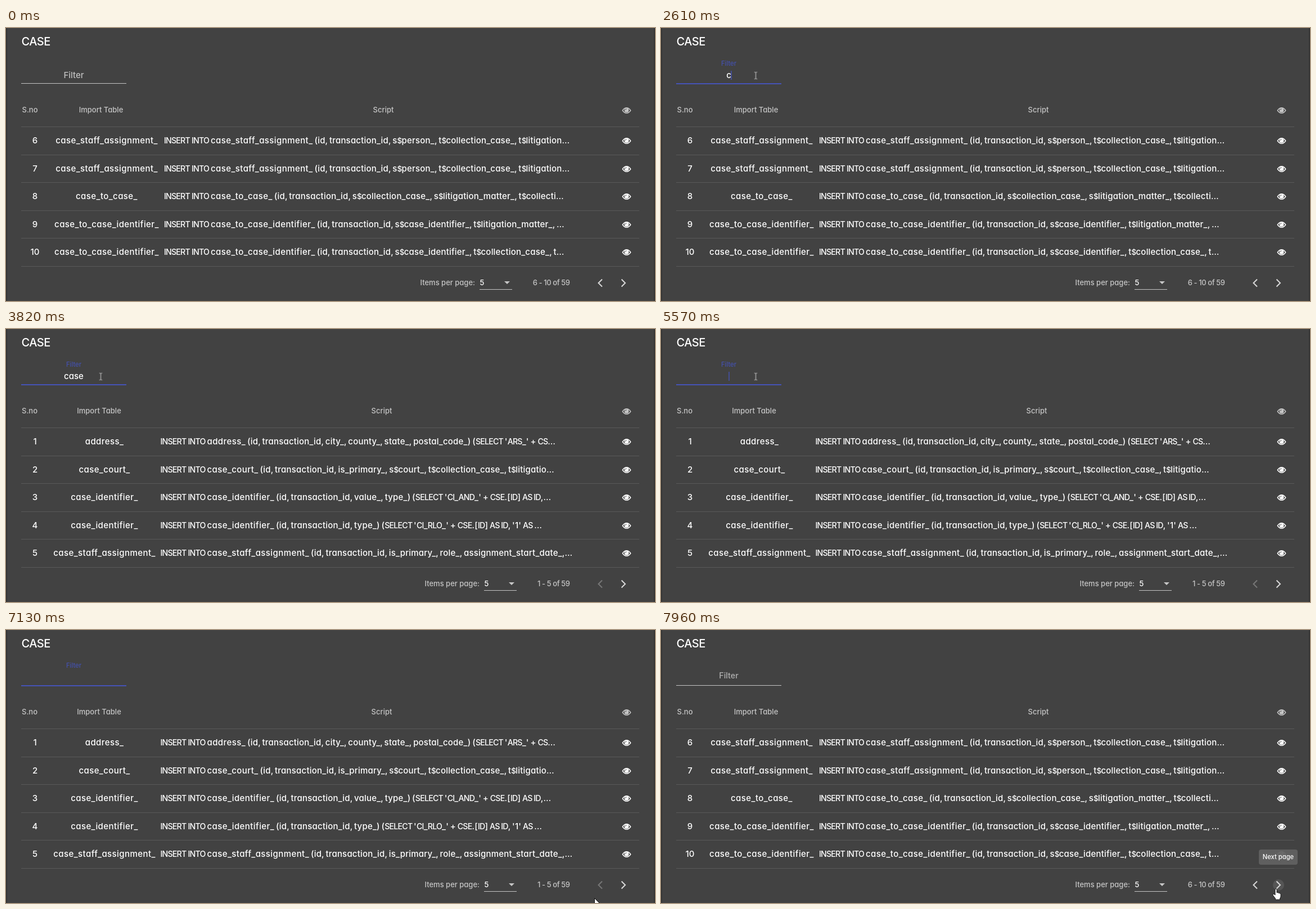
Write an HTML page that moves like this. It is 1154 px wide and 485 px high and loops after 8000 ms.

```html
<!DOCTYPE html>
<html lang="en">
<head>
<meta charset="utf-8">
<title>Case import scripts</title>
<style>
html, body { margin: 0; width: 100%; height: 100%; overflow: hidden; background: #424242; }
svg { display: block; width: 1154px; height: 485px; font: 450 15px Inter, sans-serif; font-feature-settings: "cv11"; }
text { fill: #fff; white-space: pre; }
.mid { text-anchor: middle; }
.end { text-anchor: end; }
.title { font-size: 20px; letter-spacing: -.5px; }
.name { letter-spacing: .42px; }
.script { letter-spacing: .2px; word-spacing: -1.5px; }
.caps { font-size: 14.2px; letter-spacing: -.8px; }
.dollar { font-size: 13.5px; letter-spacing: -.8px; }
.soft { font-size: 13px; fill: #c6c6c6; }
.range { letter-spacing: -.4px; }
.small { font-size: 13px; }
.rule { stroke: #595959; }
.chevron { fill: none; stroke: #d8d8d8; stroke-width: 2; }
.off { stroke: #777; }

/* 1% of the loop is 80 ms */
.steps, .steps > * { animation: 8s step-end infinite; }
#pageA { animation-name: pageA; }
#pageB { animation-name: pageB; }
@keyframes pageA { 0% { opacity: 1 } 33.375% { opacity: 0 } 99.4% { opacity: 1 } }
@keyframes pageB { 0% { opacity: 0 } 33.375% { opacity: 1 } 99.4% { opacity: 0 } }

#label { animation: label 8s infinite; transform-origin: 0 0; }
@keyframes label {
  0%, 20.3% { transform: translate(120.5px, 88.5px) scale(1); fill: #c0c0c0; animation-timing-function: cubic-bezier(.25,.8,.25,1) }
  24.9%, 97.9% { transform: translate(120.5px, 67px) scale(.75); fill: #4451ae; animation-timing-function: cubic-bezier(.25,.8,.25,1) }
  99.5% { transform: translate(120.5px, 85.5px) scale(.95); fill: #b0b0b0 }
  100% { transform: translate(120.5px, 86px) scale(.96); fill: #b4b4b4 }
}
#focus { animation: focus 8s infinite; transform-origin: 120.5px 0; }
@keyframes focus {
  0%, 20.3% { transform: scaleX(.5); opacity: 0; animation-timing-function: cubic-bezier(.25,.8,.25,1) }
  24%, 98% { transform: none; opacity: 1 }
  98.8%, 100% { transform: none; opacity: 0 }
}

#typed > * { opacity: 0; }
#t1 { animation-name: t1 }
#t2 { animation-name: t2 }
#t3 { animation-name: t3 }
#t4 { animation-name: t4 }
#pick { animation-name: pick }
@keyframes t1 { 31.5% { opacity: 1 } 34.4% { opacity: 0 } }
@keyframes t2 { 34.4% { opacity: 1 } 36.125% { opacity: 0 } }
@keyframes t3 { 36.125% { opacity: 1 } 41% { opacity: 0 } }
@keyframes t4 { 41% { opacity: 1 } 69.625% { opacity: 0 } }
@keyframes pick { 65% { opacity: 1 } 69.625% { opacity: 0 } }
#caret { animation-name: caret; }
@keyframes caret {
  0% { opacity: 0; transform: none }
  20.375% { opacity: 1; transform: none }
  31.5% { opacity: 1; transform: translateX(4px) }
  34.4% { opacity: 1; transform: translateX(9px) }
  36.125% { opacity: 1; transform: translateX(13px) }
  41% { opacity: 1; transform: translateX(17px) }
  47.75% { opacity: 0; transform: translateX(17px) }
  54.25% { opacity: 1; transform: translateX(17px) }
  61% { opacity: 0; transform: none }
  69.625% { opacity: 1; transform: none }
  76.25% { opacity: 0; transform: none }
  82.9% { opacity: 1; transform: none }
  89.1% { opacity: 0; transform: none }
  95.75% { opacity: 1; transform: none }
  98.375% { opacity: 0; transform: none }
}

#hover { animation-name: hover; }
@keyframes hover { 0% { opacity: 0 } 93.75% { opacity: 1 } }
#tip { animation: tip 8s infinite; transform-origin: 1097.5px 403px; }
@keyframes tip {
  0%, 95% { opacity: 0; transform: scale(.4) }
  96.625%, 100% { opacity: 1; transform: none }
}

#mouse { animation: mouse 8s linear infinite; }
@keyframes mouse {
  0%, 4.75% { transform: translate(1106px, 438px) }
  8.75% { transform: translate(600px, 215px) }
  13% { transform: translate(190px, 66px) }
  14.75%, 16.8% { transform: translate(166px, 90px) }
  18.4%, 75.5% { transform: translate(168.5px, 84.5px) }
  76.5%, 78.2% { transform: translate(300px, 66px) }
  83.75% { transform: translate(720px, 260px) }
  88.1%, 89.8% { transform: translate(1046px, 476px) }
  95.5%, 100% { transform: translate(1094px, 460px) }
}
#arrow { animation-name: arrow; }
#beam { animation-name: beam; }
#hand { animation-name: hover; }
@keyframes arrow { 0% { opacity: 0 } 4.75% { opacity: 1 } 16.875% { opacity: 0 } 75.625% { opacity: 1 } 93.75% { opacity: 0 } }
@keyframes beam { 0% { opacity: 0 } 16.875% { opacity: 1 } 75.625% { opacity: 0 } }
</style>
</head>
<body>
<svg viewBox="0 0 1154 485">
  <defs>
    <g id="eye">
      <path d="M-7.2 0Q-4 -4.8 0 -4.8T7.2 0Q4 4.8 0 4.8T-7.2 0Z" fill="none" stroke="currentColor" stroke-width="1.4"/>
      <circle cy="-.6" r="3.9" fill="currentColor"/>
      <path d="M-2.2 -.6Q-2.2 -2.8 0 -2.8" fill="none" stroke="#424242" stroke-width=".9"/>
    </g>
  </defs>
  <path d="M1 0V485M1153 0V485" stroke="#323232" stroke-width="2"/>
  <text class="title" x="27.5" y="31">CASE</text>

  <path d="M27 98.5H214" stroke="#c4c4c4"/>
  <path id="focus" d="M27 99H214" stroke="#4553b6" stroke-width="2"/>
  <text id="label" class="mid">Filter</text>
  <g id="typed" class="steps mid">
    <rect id="pick" x="103" y="76" width="35" height="16" fill="#3297fd"/>
    <text id="t1" x="120.5" y="88.5">c</text>
    <text id="t2" x="120.5" y="88.5">ca</text>
    <text id="t3" x="120.5" y="88.5">cas</text>
    <text id="t4" x="120.5" y="88.5">case</text>
    <path id="caret" d="M121 76V92" stroke="#4553b6" stroke-width="1.4"/>
  </g>

  <g id="grid"></g>
  <g class="steps"><g id="pageA"></g><g id="pageB"></g></g>
  <g class="steps"><circle id="hover" cx="1098" cy="453" r="10" fill="#fff" fill-opacity=".1"/></g>
  <path class="chevron" d="M1094.5 446.5L1101 453L1094.5 459.5"/>
  <g id="tip">
    <rect x="1063" y="390" width="69" height="27" rx="4" fill="#616161" fill-opacity=".94"/>
    <text class="mid" x="1097.5" y="407" font-size="11.2">Next page</text>
  </g>

  <g id="mouse"><g class="steps">
    <path id="arrow" d="M.5 .5V16.5L4.3 13L6.8 18.5L9.3 17.4L6.9 12H12Z" fill="#fff" stroke="#111"/>
    <path id="beam" d="M-2.5 -6H-.8L0 -5.2L.8 -6H2.5M0 -5.2V5.2M-2.5 6H-.8L0 5.2L.8 6H2.5" fill="none" stroke="#d5d5d5"/>
    <path id="hand" d="M-2 1.5Q-2 0 -.5 0T1 1.5V6.5Q3.2 5.8 3.8 7.2Q5.6 6.6 6.2 8Q8 7.8 8 9.5V13Q8 15 6.5 17V19H-1.5V17L-6 11Q-6.8 9.4 -5 9Q-3.6 9 -2 11Z" fill="#fff" stroke="#111" stroke-width=".9"/>
  </g></g>
</svg>
<script>
const staff = "case_staff_assignment_", link = "case_to_case_identifier_";
const head = "(id, transaction_id, ";
const pages = {
  pageA: {
    first: 6, shift: 0, tableX: 179, scriptX: 281, headX: [42.5, 169, 671], range: "6 - 10 of 59",
    rows: [
      [staff, head + "s$person_, t$collection_case_, t$litigation…"],
      [staff, head + "s$person_, t$collection_case_, t$litigation…"],
      ["case_to_case_", head + "s$collection_case_, s$litigation_matter_, t$collecti…"],
      [link, head + "s$case_identifier_, t$litigation_matter_, …"],
      [link, head + "s$case_identifier_, t$collection_case_, t…"]
    ]
  },
  pageB: {
    first: 1, shift: 8, tableX: 175, scriptX: 274.5, headX: [42, 165.5, 668], range: "1 - 5 of 59",
    rows: [
      ["address_", head + "city_, county_, state_, postal_code_) (SELECT 'ARS_' + CS…"],
      ["case_court_", head + "is_primary_, s$court_, t$collection_case_, t$litigatio…"],
      ["case_identifier_", head + "value_, type_) (SELECT 'CI_AND_' + CSE.[ID] AS ID,…"],
      ["case_identifier_", head + "type_) (SELECT 'CI_RLO_' + CSE.[ID] AS ID, '1' AS …"],
      [staff, head + "is_primary_, role_, assignment_start_date_,…"]
    ]
  }
};

const text = (cls, x, y, s) => `<text class="${cls}" x="${x}" y="${y}">${s}</text>`;
const span = (cls, s) => `<tspan class="${cls}">${s}</tspan>`;
const eye = (y, color) => `<use href="#eye" x="1103.5" y="${y}" color="${color}"/>`;
const style = s => s.replace(/[A-Z]{2,}|\$/g, w => span(w === "$" ? "dollar" : "caps", w));
const rowY = i => Math.round(175 + 49.6 * i);

let grid = eye(146.5, "#c6c6c6");
for (let i = 0; i < 6; i++) {
  grid += `<path class="rule" d="M27 ${rowY(i) + .5}H1126"/>`;
  if (i < 5) grid += eye(rowY(i) + 25.5, "#fff");
}
document.getElementById("grid").innerHTML = grid;

for (const [id, p] of Object.entries(pages)) {
  let out = ["S.no", "Import Table", "Script"].map((s, i) => text("soft mid", p.headX[i], 150, s)).join("");
  p.rows.forEach(([table, rest], i) => {
    const y = rowY(i) + 29.5;
    out += text("mid", p.tableX - 127.5 + p.shift / 2, y, p.first + i)
      + text("name mid", p.tableX, y, table)
      + text("script", p.scriptX, y, span("name", style("INSERT INTO ") + " ".trim() + table + " ") + style(rest));
  });
  const x = p.shift;
  out += text("soft end", 834 + x, 457, "Items per page:")
    + text("small", 842.5 + x, 457, 5)
    + `<path d="M${842 + x} 464.5h58" stroke="#c4c4c4"/>`
    + `<path d="M${886 + x} 450h10l-5 5z" fill="#c6c6c6"/>`
    + text("soft range end", 1002.5, 457, p.range)
    + `<path class="chevron${x ? " off" : ""}" d="M1060 446.5L1053.5 453L1060 459.5"/>`;
  document.getElementById(id).innerHTML = out;
}
</script>
</body>
</html>
```
